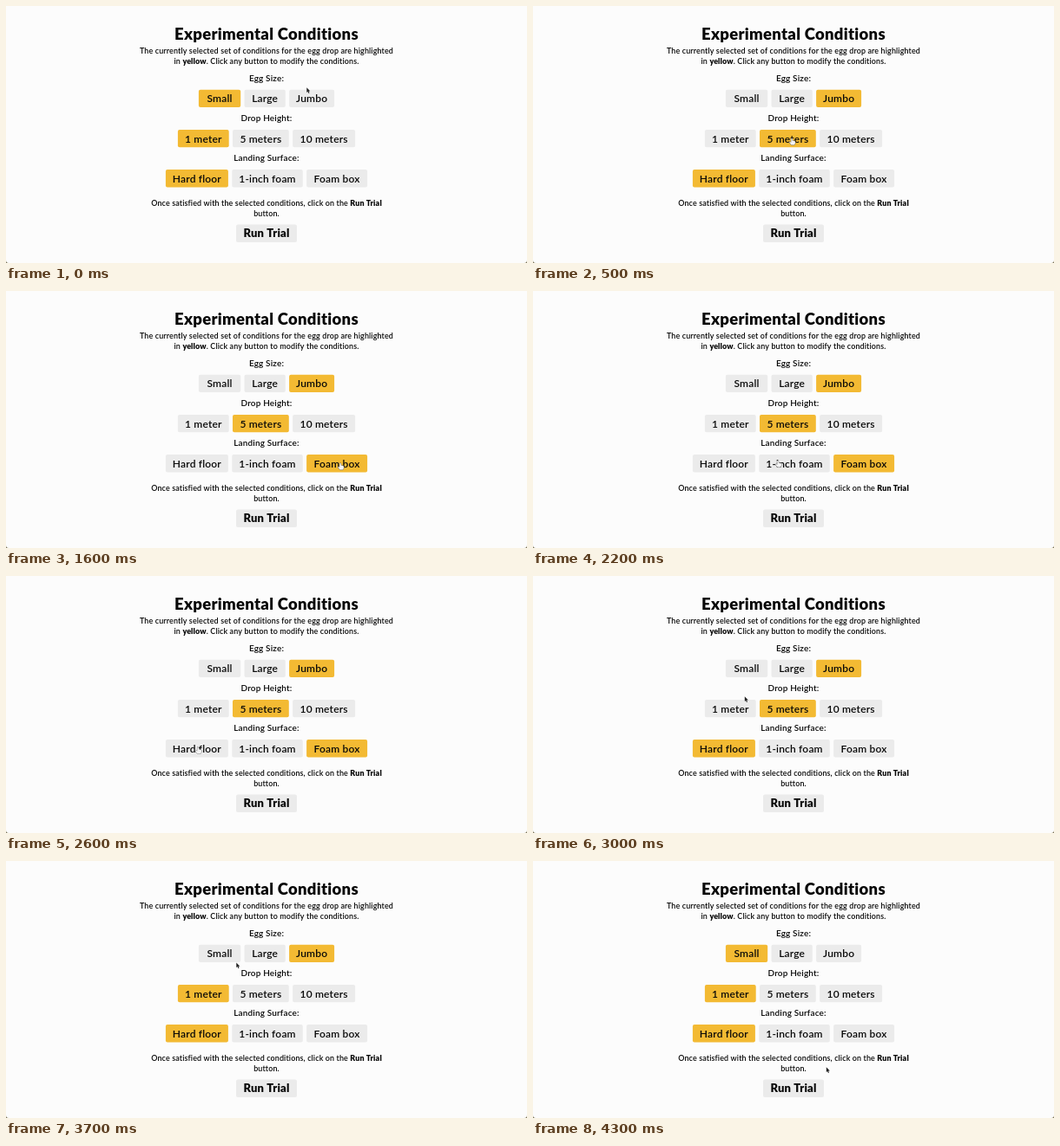
An HTML page with a canvas for the animation above (4400 ms loop, 600 px wide and 297 px high).

```html
<!DOCTYPE html>
<html lang="en">
<head>
<meta charset="utf-8">
<title>Experimental Conditions</title>
<style>
html, body { margin: 0; width: 100%; height: 100%; overflow: hidden; background: #fcfcfc; }
canvas { display: block; width: 600px; height: 297px; }
</style>
</head>
<body>
<canvas id="stage"></canvas>
<script>
const W = 600, H = 297, LOOP = 4400, STEP = 100;
const PAPER = '#fcfcfc', GREY = '#ebebeb', YELLOW = '#f3ba33';
const FAMILY = 'Lato, "Open Sans", sans-serif';
const TEXT = 600, BOLD = 900, SPACING = 0.015;
const ROW_TOP = 96.7, ROW_PITCH = 46.2, BUTTON_H = 20.4, GAP = 4.3;

const canvas = document.getElementById('stage');
const ctx = canvas.getContext('2d');
const ratio = window.devicePixelRatio || 1;
canvas.width = W * ratio;
canvas.height = H * ratio;

const groups = [
  ['Egg Size:', { Small: 48.3, Large: 47.3, Jumbo: 52 }],
  ['Drop Height:', { '1 meter': 58.8, '5 meters': 64.8, '10 meters': 72 }],
  ['Landing Surface:', { 'Hard floor': 72, '1-inch foam': 81.6, 'Foam box': 70 }]
];

// Lays each group out as one centred row.
const buttons = groups.flatMap(([, widths], row) => {
  const entries = Object.entries(widths);
  const total = entries.reduce((sum, [, w]) => sum + w + GAP, -GAP);
  let left = (W - total) / 2;
  return entries.map(([label, width]) => {
    const box = { label, row, left, width, top: ROW_TOP + row * ROW_PITCH };
    left += width + GAP;
    return box;
  });
});
const runButton = { label: 'Run Trial', left: 265, width: 70, top: 252.6 };

// Pointer stops; a stop with click picks the button under it.
const stops = [
  { t: 0, x: 346, y: 94 },
  { t: 200, x: 353, y: 107, click: true },
  { t: 500, x: 298, y: 153, click: true },
  { t: 800, x: 214, y: 196 },
  { t: 1000, x: 312, y: 150 },
  { t: 1500, x: 385, y: 198, click: true },
  { t: 1600, x: 385, y: 199 },
  { t: 1900, x: 330, y: 102 },
  { t: 2200, x: 282, y: 196 },
  { t: 2700, x: 214, y: 198, click: true },
  { t: 3000, x: 243.5, y: 139 },
  { t: 3300, x: 226, y: 152, click: true },
  { t: 3700, x: 265, y: 117.2 },
  { t: 4200, x: 245, y: 106, click: true },
  { t: 4300, x: 337.5, y: 238 }
];

const ease = k => k * k * (3 - 2 * k);

function pointerAt(t) {
  const next = stops.findIndex(s => s.t > t);
  if (next < 0) return stops[stops.length - 1];
  const a = stops[next - 1], b = stops[next];
  const k = ease((t - a.t) / (b.t - a.t));
  return { x: a.x + (b.x - a.x) * k, y: a.y + (b.y - a.y) * k };
}

const hit = ({ x, y }) => [...buttons, runButton].find(b =>
  x >= b.left && x <= b.left + b.width && y >= b.top && y < b.top + BUTTON_H);

function chosenAt(t) {
  const chosen = [0, 3, 6].map(i => buttons[i]);
  for (const stop of stops) {
    if (stop.click && stop.t <= t) {
      const b = hit(stop);
      chosen[b.row] = b;
    }
  }
  return chosen;
}

// Centres a line; words between asterisks are bold.
function line(text, y, size, weight = TEXT, cx = W / 2) {
  const setFont = i => {
    ctx.font = `${i % 2 ? BOLD : weight} ${size}px ${FAMILY}`;
    ctx.letterSpacing = `${size * SPACING}px`;
  };
  const parts = text.split('*');
  const widths = parts.map((part, i) => {
    setFont(i);
    return ctx.measureText(part).width;
  });
  let x = cx - widths.reduce((a, b) => a + b) / 2;
  ctx.fillStyle = '#080808';
  parts.forEach((part, i) => {
    setFont(i);
    ctx.fillText(part, x, y);
    x += widths[i];
  });
}

function drawButton({ label, left, width, top }, fill, weight, size) {
  ctx.fillStyle = fill;
  ctx.beginPath();
  ctx.roundRect(left, top, width, BUTTON_H, 2);
  ctx.fill();
  line(label, top + 14.6, size, weight, left + width / 2);
}

function drawPointer(pos) {
  const over = hit(pos);
  const outline = over
    ? 'M-.6 0H.6L.8 2.4L3.8 3.2L4 5.6L3 7.6H-.6L-2.8 4.6L-2.2 4L-.8 4.8Z'
    : 'M.3 .3V6L1.6 4.9L2.5 7L3.5 6.6L2.6 4.6L4.4 4.5Z';
  const shape = new Path2D(outline);
  ctx.save();
  ctx.translate(pos.x, pos.y);
  ctx.lineJoin = 'round';
  ctx.lineWidth = over ? 0.8 : 1;
  ctx.strokeStyle = over ? '#555' : '#fff';
  ctx.stroke(shape);
  ctx.fillStyle = over ? '#f4f4f4' : '#222';
  ctx.fill(shape);
  ctx.restore();
}

function drawCorners() {
  ctx.fillStyle = '#6b6444';
  for (const [x, dir] of [[0, 1], [W, -1]]) {
    ctx.beginPath();
    ctx.moveTo(x, H - 3);
    ctx.quadraticCurveTo(x, H, x + dir * 3, H);
    ctx.lineTo(x, H);
    ctx.fill();
  }
}

function draw(t) {
  ctx.setTransform(ratio, 0, 0, ratio, 0, 0);
  ctx.fillStyle = PAPER;
  ctx.fillRect(0, 0, W, H);
  drawCorners();

  line('Experimental Conditions', 39.2, 18.5, BOLD);
  line('The currently selected set of conditions for the egg drop are highlighted', 54.8, 8.95);
  line('in *yellow*. Click any button to modify the conditions.', 67.3, 8.95);
  line('Once satisfied with the selected conditions, click on the *Run Trial*', 230.8, 8.95);
  line('button.', 243.2, 8.95);

  groups.forEach(([title], row) => line(title, 87 + row * ROW_PITCH, 10));
  const chosen = chosenAt(t);
  buttons.forEach(b => drawButton(b, chosen.includes(b) ? YELLOW : GREY, TEXT, 12));
  drawButton(runButton, GREY, BOLD, 13);
  drawPointer(pointerAt(t));
}

function tick() {
  const t = performance.now() % LOOP;
  draw(Math.floor(t / STEP) * STEP);
  requestAnimationFrame(tick);
}
tick();
</script>
</body>
</html>
```
